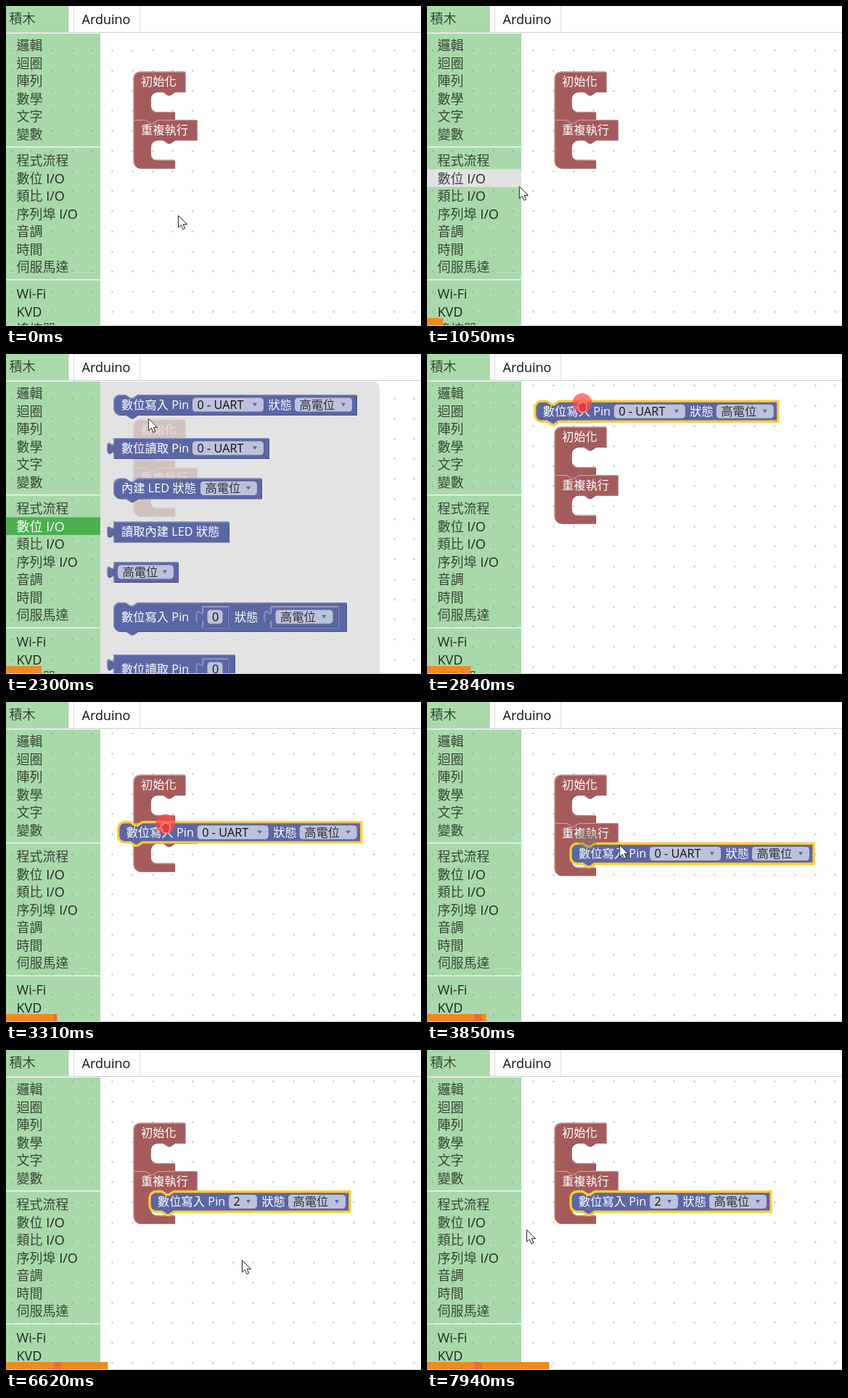
Write an HTML page with a canvas that moves like this. It is 572x442 px and loops after 8000 ms.

```html
<!DOCTYPE html>
<html lang="zh-Hant">
<head>
<meta charset="utf-8">
<title>Block editor</title>
<style>
  html, body { margin: 0; width: 100%; height: 100%; overflow: hidden; background: #fff; }
  canvas { display: block; width: 572px; height: 442px; }
</style>
</head>
<body>
<canvas id="stage"></canvas>
<script>
const W = 572, H = 442, LOOP = 8000;
const ZOOM = 1.11, GRID = 25 * ZOOM;
const FONT = '"Open Sans", "Noto Sans CJK TC", "Noto Sans CJK", sans-serif';
const BLUE = { fill: '#5b67a5', light: '#8c95c0', dark: '#495284' };
const RED = { fill: '#a55b5b', light: '#c99b9b', dark: '#844949' };

// Event times in ms
const T = {
  flyoutOpen: 1420, blockHover: 2380, grab: 2420, dragStart: 2610, snap: 3500, release: 3600,
  chipHover: 4450, menuOpen: 5200, pick: 6480
};
// Pointer path: time, x, y
const PATH = [
  [0, 237, 289], [250, 237, 289], [820, 180, 270], [1050, 127, 249], [1300, 85, 241], [1600, 85, 241],
  [2300, 196, 89], [2480, 212, 60], [2600, 212, 60], [2840, 214, 70], [3400, 221, 190], [3600, 221, 190],
  [3850, 265, 197], [4700, 340, 215], [5600, 340, 215], [6200, 325, 290], [6850, 325, 290],
  [7630, 200, 273], [7940, 137, 248], [8000, 137, 248]
];
const MENU = [
  [54, ['邏輯', '迴圈', '陣列', '數學', '文字', '變數']],
  [213, ['程式流程', '數位 I/O', '類比 I/O', '序列埠 I/O', '音調', '時間', '伺服馬達']],
  [397, ['Wi-Fi', 'KVD', '遙控器']]
];
const PINS = ['0 - UART', '1 - UART', '2', '3', '4', '5', '6', '7'];

const canvas = document.getElementById('stage');
const ctx = canvas.getContext('2d');
const dpr = window.devicePixelRatio || 1;
canvas.width = W * dpr;
canvas.height = H * dpr;

const between = (t, a, b) => t >= a && t < b;

function pointerAt(t) {
  const i = Math.max(1, PATH.findIndex(p => p[0] >= t));
  const [t0, x0, y0] = PATH[i - 1], [t1, x1, y1] = PATH[i];
  const k = (t - t0) / (t1 - t0);
  return { x: x0 + (x1 - x0) * k, y: y0 + (y1 - y0) * k };
}

function rect(x, y, w, h, color) {
  ctx.fillStyle = color;
  ctx.fillRect(x, y, w, h);
}

// Dark Chinese runs are set thinner than the Latin ones
function text(str, x, middle, size, color) {
  ctx.fillStyle = color;
  for (const run of str.split(/([^\x00-\x7f]+)/)) {
    const thin = color !== '#fff' && run > '\x7f';
    ctx.font = `${thin ? 300 : 400} ${size}px ${FONT}`;
    ctx.globalAlpha = thin ? 0.82 : 1;
    ctx.fillText(run, x, middle + size * 0.36);
    x += ctx.measureText(run).width;
  }
  ctx.globalAlpha = 1;
}

function rounded(x, y, w, h, radii, color) {
  ctx.beginPath();
  ctx.roundRect(x, y, w, h, radii);
  ctx.fillStyle = color;
  ctx.fill();
}

// Outlines in block units, built from the same notch and corners
const NOTCH = 'l 6,4 3,0 6,-4', NOTCH_BACK = 'l -6,4 -3,0 -6,-4';
const ROUND_TOP = 'M 0,8 A 8,8 0 0 1 8,0', ROUND_BOTTOM = 'H 8 a 8,8 0 0 1 -8,-8 z';

const statementShape = (w, h) =>
  `${ROUND_TOP} H 15 ${NOTCH} H ${w} v ${h} H 30 ${NOTCH_BACK} ${ROUND_BOTTOM}`;
const outputShape = (w, h) =>
  `M 0,0 H ${w} v ${h} H 0 V 20 c 0,-10 -8,8 -8,-7.5 s 8,2.5 8,-7.5 z`;
const mouthShape = (w, gap) =>
  `H ${w} v 25 H 51 ${NOTCH_BACK} h -7 a 8,8 0 0 0 -8,8 v ${gap - 16} a 8,8 0 0 0 8,8 H 51 v 10`;

function drawShape(x, y, outline, color, selected) {
  const path = new Path2D();
  path.addPath(new Path2D(outline), { a: ZOOM, d: ZOOM });
  ctx.save();
  ctx.translate(x + 1, y + 1);
  ctx.fillStyle = color.dark;
  ctx.fill(path);
  ctx.translate(-1, -1);
  ctx.fillStyle = color.fill;
  ctx.fill(path);
  if (selected) {
    ctx.strokeStyle = '#fc3';
    ctx.lineWidth = 3.3;
    ctx.stroke(path);
  } else {
    ctx.clip(path);
    ctx.translate(0.6, 0.6);
    ctx.strokeStyle = color.light;
    ctx.lineWidth = 1.3;
    ctx.stroke(path);
  }
  ctx.restore();
}

const statement = (x, y, w, h = 28, selected = false) =>
  drawShape(x, y, statementShape(w / ZOOM, h / ZOOM), BLUE, selected);
const output = (x, y, w, h = 28) => drawShape(x, y, outputShape(w / ZOOM, h / ZOOM), BLUE);
const label = (str, x, middle) => text(str, x, middle, 16.3, '#fff');

function chip(str, x, middle, w, { arrow = true, outlined = false } = {}) {
  rounded(x, middle - 9.5, w, 19, 4.5, 'rgba(255,255,255,.6)');
  if (outlined) {
    ctx.strokeStyle = '#fff';
    ctx.lineWidth = 1.8;
    ctx.stroke();
  }
  text(str, x + 6.5, middle, 16.3, '#111');
  if (!arrow) return;
  const cx = x + w - 12;
  ctx.beginPath();
  ctx.moveTo(cx - 3, middle - 2.5);
  ctx.lineTo(cx + 3, middle - 2.5);
  ctx.lineTo(cx, middle + 2.5);
  ctx.fillStyle = BLUE.fill;
  ctx.fill();
}

function writePinBlock(x, y, { pin = PINS[0], selected = false, outlined = false } = {}) {
  const pinWidth = pin.length > 1 ? 98 : 39, after = x + 109 + pinWidth;
  statement(x, y, pinWidth + 237, 28, selected);
  label('數位寫入 Pin', x + 11, y + 14);
  chip(pin, x + 109, y + 14, pinWidth, { outlined });
  label('狀態', after + 6.5, y + 14);
  chip('高電位', after + 43, y + 14, 79);
}

// Small value block plugged into a socket
function plug(str, x, middle, w, arrow) {
  ctx.save();
  ctx.translate(x, middle - 14);
  ctx.scale(ZOOM, ZOOM);
  ctx.strokeStyle = BLUE.light;
  ctx.lineWidth = 1.6;
  ctx.stroke(new Path2D(outputShape(w / ZOOM, 26)));
  ctx.restore();
  output(x, middle - 14, w - 1);
  chip(str, x + 6.5, middle, w - 14, { arrow });
}

function drawFlyout(hovered) {
  const x = 148;
  rounded(130, 38, 385, 404, [0, 9, 0, 0], 'rgba(221,221,221,.8)');
  writePinBlock(x, 56, { selected: hovered });

  output(x, 116, 214);
  label('數位讀取 Pin', 159, 130);
  chip(PINS[0], 257, 130, 98);

  statement(x, 171.5, 204);
  label('內建 LED 狀態', 159, 185.5);
  chip('高電位', 268, 185.5, 78);

  output(x, 231.5, 159);
  label('讀取內建 LED 狀態', 159, 245.5);

  output(x, 287, 89);
  chip('高電位', 154, 301, 77);

  statement(x, 343, 321, 40);
  label('數位寫入 Pin', 159, 363);
  plug('0', 271, 363, 35, false);
  label('狀態', 315, 363);
  plug('高電位', 365, 363, 93, true);

  output(x, 415, 167, 40);
  label('數位讀取 Pin', 159, 435);
  plug('0', 271, 435, 35, false);
}

function drawGrid(shift) {
  for (let gy = 33.25 + shift; gy < H; gy += GRID)
    for (let gx = 7.25; gx < W; gx += GRID) {
      const x = Math.round(gx), y = Math.round(gy);
      rect(x - 1, y, 3, 1, '#ccc');
      rect(x, y - 1, 1, 3, '#ccc');
    }
}

function drawProgram(shift, filled) {
  const y = 90.5 + shift;
  drawShape(175.5, y, `${ROUND_TOP} ${mouthShape(64, 25)} H 30 ${NOTCH_BACK} H 0 z`, RED);
  label('初始化', 186, y + 13.5);
  drawShape(175.5, y + 66.6,
    `M 0,0 H 15 ${NOTCH} ${mouthShape(78.5, filled ? 30 : 25)} ${ROUND_BOTTOM}`, RED);
  label('重複執行', 186, y + 80.5);
}

function drawSidebar(t, pointer) {
  rect(0, 38, 130, 404, 'rgba(76,175,80,.48)');
  const open = between(t, T.flyoutOpen, T.dragStart);
  const over = t < T.flyoutOpen && pointer.x < 130;
  if (open || over) rect(0, 225.5, 130, 24.5, open ? '#4caf50' : '#e2e2e2');
  for (const [top, names] of MENU)
    names.forEach((name, i) =>
      text(name, 14.5, top + 0.8 + i * 24.5, 18, open && name === '數位 I/O' ? '#fff' : '#1d261d'));
  rect(0, 194, 130, 1.5, '#eef7ee');
  rect(0, 377.5, 130, 1.5, '#eef7ee');
}

function drawHeader() {
  rect(0, 0, W, 38, '#fff');
  rect(0, 0, 86, 36, '#a9dbaa');
  rect(86, 0, 1, 36, '#ddd');
  rect(93, 0, 1, 36, '#ddd');
  rect(184, 0, 1, 36, '#ddd');
  rect(0, 36, W, 1, '#ccc');
  text('積木', 4.5, 18, 18, '#1d261d');
  text('Arduino', 104.5, 18.5, 18, '#111');
}

function drawPinMenu(pointer) {
  rect(278, 219, 194, H, '#777');
  rect(279, 220, 192, H, '#fff');
  PINS.forEach((pin, i) => {
    const middle = 235 + i * 28;
    if (Math.abs(pointer.y - middle) < 14) rect(279, middle - 14, 192, 28, '#d6e9f8');
    text(pin, 310.5, middle, 15.2, '#111');
  });
  ctx.strokeStyle = '#000';
  ctx.lineWidth = 2.4;
  ctx.stroke(new Path2D('M 290,234.5 l 3,3.5 5,-8'));
}

function disc(x, y, color) {
  ctx.beginPath();
  ctx.arc(x, y, 13.5, 0, 2 * Math.PI);
  ctx.fillStyle = color;
  ctx.fill();
}

const ARROW = new Path2D('M 0.5,0.5 V 17 L 4.3,13.5 L 7,19.5 L 9.7,18.3 L 7.2,12.5 H 12.5 Z');
const FIST = new Path2D('M -6,0 V -3 q 1.5,-2 3,0 V -5 q 1.5,-2 3,0 q 1.5,-2 3,0 v 1 q 2,-2 3,0 V 3 L 4,8 H -3 Z');

function drawPointer({ x, y }, fist, pressed) {
  const shape = fist ? FIST : ARROW;
  ctx.save();
  ctx.translate(x, fist ? y + 2 : y);
  ctx.fillStyle = pressed ? '#e23c3c' : '#fff';
  ctx.strokeStyle = pressed ? '#ffb4b4' : '#222';
  ctx.lineWidth = 1;
  ctx.fill(shape);
  ctx.stroke(shape);
  ctx.restore();
}

function drawProgress(t) {
  const width = t * 0.0212;
  rect(0, 431, width, 10, '#ef8a1f');
  for (let x = 23; x < width; x += 12) rect(x, 431, 1, 10, '#e8821d');
  if (width > 65) rect(65, 431, Math.min(width - 65, 11), 10, '#ec6f35');
  rect(0, 441, W, 1, '#ccc');
}

function draw(t) {
  const pointer = pointerAt(t);
  const dragged = t >= T.dragStart, snapped = t >= T.snap;
  const pressed = between(t, T.dragStart, T.release);
  const shift = dragged ? 10 : 0;
  ctx.setTransform(dpr, 0, 0, dpr, 0, 0);
  rect(0, 0, W, H, '#fff');
  drawGrid(shift);
  drawProgram(shift, snapped);
  drawSidebar(t, pointer);
  drawHeader();

  if (between(t, T.flyoutOpen, T.dragStart)) drawFlyout(t >= T.blockHover);
  if (dragged) {
    writePinBlock(snapped ? 198 : pointer.x - 65.2, snapped ? 195.5 : pointer.y - 5, {
      pin: t < T.pick ? PINS[0] : PINS[2],
      selected: true,
      outlined: between(t, T.chipHover, T.pick)
    });
  }
  if (between(t, T.menuOpen, T.pick)) drawPinMenu(pointer);

  if (pressed) disc(pointer.x, pointer.y - 2.5, 'rgba(255,72,72,.72)');
  if (between(t, T.release, T.release + 600))
    disc(221, 190, `rgba(125,125,110,${0.8 * (1 - (t - T.release) / 600)})`);
  drawProgress(t);
  drawPointer(pointer, between(t, T.grab, T.release), pressed);
}

const start = performance.now();
function tick() {
  draw((performance.now() - start) % LOOP);
  requestAnimationFrame(tick);
}
tick();
</script>
</body>
</html>
```
